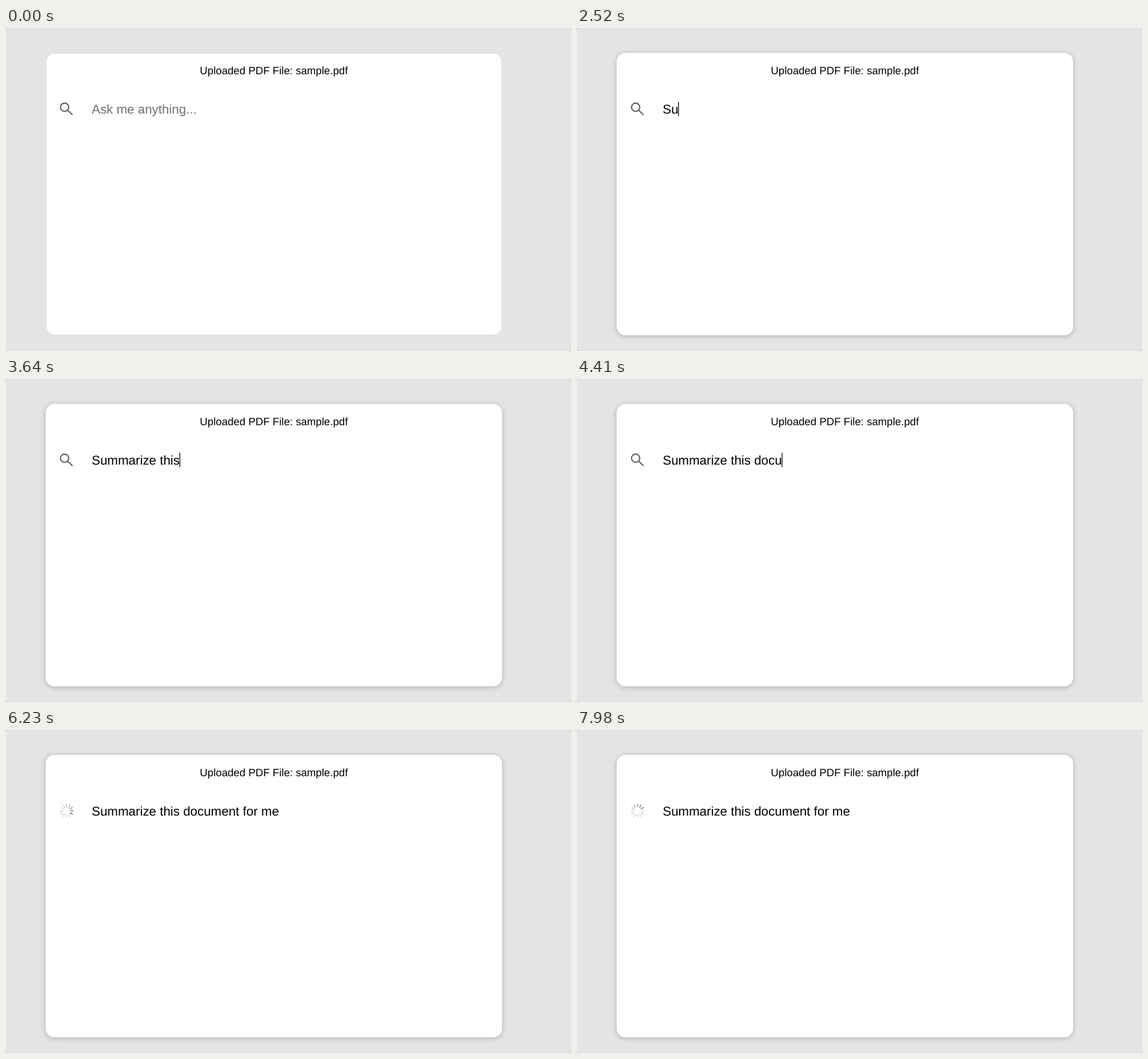
These frames come from a looping animation (989 px wide and 566 px high, 8 s). An HTML page with a canvas:

```html
<!DOCTYPE html>
<html lang="en">
<head>
<meta charset="utf-8">
<title>Ask a document</title>
<style>
  html, body { margin: 0; width: 100%; height: 100%; overflow: hidden; background: #e4e4e4; }
  canvas { display: block; width: 989px; height: 566px; }
</style>
</head>
<body>
<canvas id="stage" width="989" height="566"></canvas>
<script>
const ctx = document.getElementById('stage').getContext('2d');
const FONT = '"Liberation Sans", Arial, sans-serif';
const LOOP = 8000, TICK = 70;
const FOCUS = 1400, CARET = 1820, SUBMIT = 5950;
const CARET_OFF = [4900, 4970];
const TEXT_X = 150, TEXT_Y = 149.7;

// Each keystroke group: start time and the pieces typed one tick apart.
const TYPING = [
  [2240, ['S']], [2520, ['u']], [2730, ['m', 'm']], [2940, ['a', 'r']],
  [3150, ['i', 'z', 'e', ' ']], [3500, ['t', 'h', 'is']], [3780, [' ']],
  [4130, ['d', 'o']], [4410, ['cu']], [4970, ['m', 'e', 'n', 't', ' ']],
  [5390, ['f', 'o', 'r', ' ']], [5740, ['m', 'e']]
];
// Ticks on which the spinner rests.
const RESTS = [7070, 7490, 7840];

function typedAt(t) {
  let text = '';
  for (const [start, parts] of TYPING) {
    parts.forEach((part, i) => { if (t >= start + i * TICK) text += part; });
  }
  return text;
}

function box(x, y, w, h, r, color) {
  ctx.fillStyle = color;
  ctx.beginPath();
  ctx.roundRect(x, y, w, h, r);
  ctx.fill();
}

function label(text, x, y, size, color) {
  ctx.font = `${size}px ${FONT}`;
  ctx.fillStyle = color;
  ctx.fillText(text, x, y);
  return ctx.measureText(text).width;
}

function drawCard(focused) {
  if (!focused) {
    box(71, 45, 796, 492, 14, '#fff');
    return;
  }
  ctx.save();
  ctx.shadowColor = 'rgba(32, 33, 36, 0.28)';
  ctx.shadowBlur = 8.4;
  ctx.shadowOffsetY = 1.4;
  box(69.4, 43.5, 799, 495, 15.5, '#fff');
  ctx.restore();
}

function drawSearchIcon() {
  ctx.strokeStyle = '#5f5f5f';
  ctx.lineWidth = 2.1;
  ctx.lineCap = 'butt';
  ctx.beginPath();
  ctx.arc(102.6, 138.8, 7.2, 0, Math.PI * 2);
  ctx.moveTo(107.6, 143.8);
  ctx.lineTo(116.4, 152.3);
  ctx.stroke();
}

function spinnerHead(t) {
  const rests = RESTS.filter(r => t >= r).length;
  return Math.floor((t - SUBMIT) / TICK) - rests;
}

function drawSpinner(t) {
  const head = spinnerHead(t);
  ctx.lineWidth = 2.1;
  ctx.lineCap = 'round';
  for (let i = 0; i < 12; i++) {
    const age = (((head - i) % 12) + 12) % 12;
    const tone = Math.min(216, 134 + age * 17);
    const a = (i - 3) * Math.PI / 6;
    const dx = Math.cos(a), dy = Math.sin(a);
    ctx.strokeStyle = `rgb(${tone}, ${tone}, ${tone})`;
    ctx.beginPath();
    ctx.moveTo(106 + dx * 7.5, 141.6 + dy * 7.5);
    ctx.lineTo(106 + dx * 11.4, 141.6 + dy * 11.4);
    ctx.stroke();
  }
}

function drawInput(t) {
  const text = typedAt(t);
  let width = 0;
  if (text) width = label(text, TEXT_X, TEXT_Y, 22.35, '#000');
  else label('Ask me anything...', TEXT_X, TEXT_Y, 22.35, '#707070');

  const blinkOff = t >= CARET_OFF[0] && t < CARET_OFF[1];
  if (t >= CARET && t < SUBMIT && !blinkOff) {
    ctx.fillStyle = '#000';
    ctx.fillRect(TEXT_X + width - 0.3, 129.2, 1.3, 25.2);
  }
}

function draw(t) {
  ctx.fillStyle = '#444';
  ctx.fillRect(0, 0, 989, 566);
  box(0, 0, 989, 566, 2, '#e4e4e4');
  drawCard(t >= FOCUS);
  label('Uploaded PDF File: sample.pdf', 339.3, 80.5, 18.65, '#000');
  if (t < SUBMIT) drawSearchIcon();
  else drawSpinner(t);
  drawInput(t);
}

ctx.textRendering = 'geometricPrecision';
const began = performance.now();
function frame() {
  draw((performance.now() - began) % LOOP);
  requestAnimationFrame(frame);
}
frame();
</script>
</body>
</html>
```
